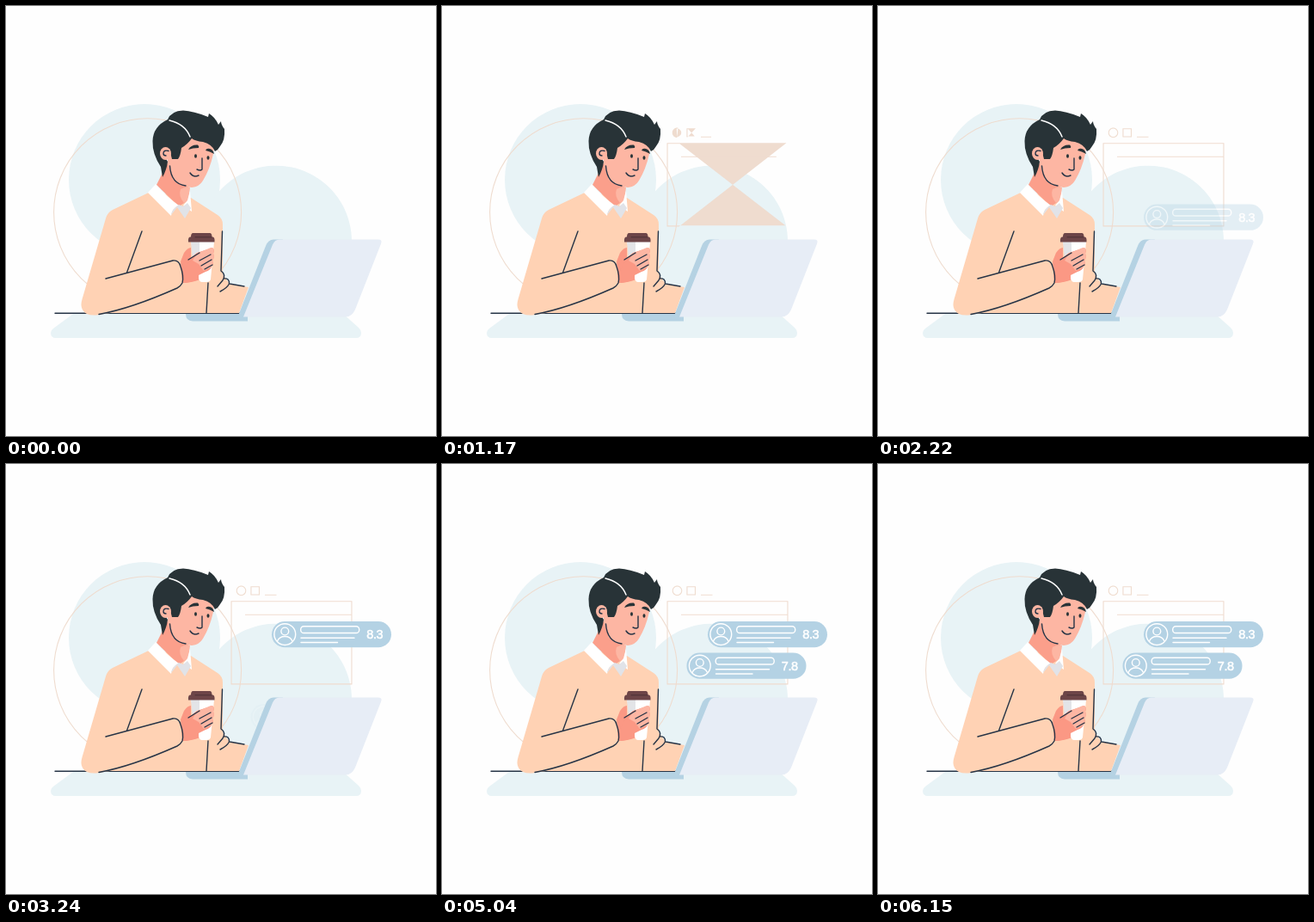
Recreate the animation shown at these times as an HTML page. Size 500 px wide and 500 px high, loop 6180 ms.

```html
<!DOCTYPE html>
<html lang="en">
<head>
<meta charset="utf-8">
<title>Coffee at the laptop</title>
<style>
  html, body { margin: 0; width: 100%; height: 100%; overflow: hidden; background: #fefefe; }
  svg { display: block; width: 100%; height: 100%; }
  .ink { fill: none; stroke: #263446; stroke-width: 1.4; stroke-linecap: round; stroke-linejoin: round; }
  .frame { fill: #efdccf; fill-rule: evenodd; }
  .thin { fill: none; stroke: #efdccf; stroke-width: 1.1; }
  .pill { fill: none; stroke: #fff; stroke-width: 1.4; stroke-linecap: round; }
  .pill text { fill: #fff; stroke-width: .55; font: 14.5px "Liberation Sans", Arial, sans-serif; letter-spacing: -.45px; }
</style>
</head>
<body>
<svg viewBox="0 0 500 500">
  <g fill="#e8f3f6">
    <circle cx="161" cy="202" r="88"/>
    <path d="M254 338A88 88 0 1 1 402 274V358H254Z"/>
    <path d="M78 358L55 375Q52 377 52 380Q52 386 58 386H407Q413 386 413 380Q413 377 410 374L392 358Z"/>
  </g>
  <circle class="thin" cx="164.600" cy="239.800" r="109"/>

  <path class="frame" id="window"/>
  <path class="thin" id="rules"/>
  <g id="pills"></g>

  <path class="ink" d="M57 357.200H281"/>

  <!-- laptop -->
  <path fill="#b5d2e3" d="M209 358H281V366.500H217Q209 366 209 358Z"/>
  <path fill="#b5d2e3" d="M270 360L302 279Q305 271.500 311 271.500H322L282 361Z"/>
  <path fill="#e7edf6" d="M276 361.500L310 277.500Q312.500 271.500 318 271.500H433Q438 271.500 436 276.500L406 353Q402 361.500 395 361.500Z"/>

  <!-- sweater -->
  <path fill="#ffd2b4" d="M168 216L124 237Q118 240 116 247L88.500 341Q85 353 94 358Q100 360.500 108 359L121 357H271L282 327L260 323L252 312V254Q252 247 246 243L215 223Z"/>

  <!-- neck, face, collar -->
  <path fill="#fb9f8b" d="M188 182L175 208L201 233L212 226V208Z"/>
  <path fill="#fdb6a3" d="M203 213Q210 209 214 211L212 226L207 229Q200 221 203 213Z"/>
  <path fill="#fdb6a3" d="M188 170L203 160L218 151L242 162L241 172Q237 190 229 203Q225 210 216 211Q201 209 194 202L188 184Z"/>
  <path fill="#fff" d="M174 207L165 217L192 244Q193 235 201 232Q187 222 174 207ZM211 226L214 215L216 239L206 232Z"/>
  <path fill="#e1e3e8" d="M201 231Q193 236 192 243L199 234L208 247L215 235L211 229L206 233Z"/>

  <!-- hair -->
  <path fill="#283337" d="M182 199L180 187Q170 172 170.500 157Q171 140 188 132Q192 122 206 121.500Q218 122 235 129L236 125Q243 129 247 138L250 134Q250 138 254 143Q255 156 249 163Q247 167 243 169Q240 161 229 158Q220 157 216 154Q211 161 204 165Q203 174 200 178H193L190 166L181 170L188 181Q187 190 182 199Z"/>
  <ellipse cx="185.500" cy="171.500" rx="6.500" ry="7.500" fill="#fdb6a3"/>
  <path fill="none" stroke="#fff" stroke-width="1.5" stroke-linecap="round" d="M190 133Q208 137 214 152"/>
  <path class="ink" d="M189 168.500Q183 167 183 171.500Q183 174 186 174M190.500 186Q192 207 209 209M228 177L228 190Q226 192 222 190M214 194Q218 200 224 197"/>
  <g fill="#283337">
    <path d="M212 167Q215 161 223 161.500Q225 163 224 165Q217 165 212 167Z"/>
    <path d="M232 168Q233 165 237 166Q241 167 242 172Q237 169 232 168Z"/>
    <ellipse cx="220.500" cy="174.500" rx="1.500" ry="2.200"/>
    <ellipse cx="235" cy="176.500" rx="1.500" ry="2.200"/>
  </g>

  <!-- sleeves -->
  <path class="ink" d="M158 262L140.500 310M251.500 262L250 308Q256 312 252 319L246 326M253 317Q260 316 259.500 323Q257 328 249 332M260 323L277 326M235 322L233 357"/>

  <!-- cup and hand -->
  <path fill="#fb9884" d="M203 297L207 287Q211 281 215 281V293L226 300V318Q215 322 205 322Z"/>
  <path fill="#fff" d="M215 274H242L238 318Q237 321 233 321H228Q225 321 224 317Z"/>
  <path fill="#e3e4e7" d="M215 274H225V296L217 295Z"/>
  <path fill="#6d4548" d="M217.500 264H237Q239.500 264 239.500 268.500H240.500Q243 269 242.500 274.500H212Q211.500 269 214 268.500H215Q215 264 217.500 264Z"/>
  <path class="ink" style="stroke:#4b2f36;stroke-width:1" d="M220 268.800H239"/>
  <path fill="#fb9884" d="M211 296L222 287L240 281Q243 283 241 288Q243 292 240 296Q242 300 239 303Q238 307 232 309L224 313V318Q214 322 205 322Z"/>
  <path fill="#fdb6a3" d="M222 288L238 281Q243 281 241 288Q243 292 240 296Q242 300 238 304L230 308L224 300L217 296Z"/>
  <path class="ink" d="M212 295L225 287M225 296L238 289M227 302L239 295M231 306L240 301"/>
  <path class="ink" d="M116 317L194 296Q201 295 203 303Q207 314 205 322Q203 326 199 328Q145 352 108 358.500"/>
</svg>

<script>
const LOOP = 6180;
const $ = id => document.getElementById(id);
const clamp = v => Math.min(1, Math.max(0, v));
const ease = v => (1 - Math.cos(Math.PI * clamp(v))) / 2;
const f = n => n.toFixed(2);

// Cuts a polyline at a share of its length; the fill closes the gap.
function trim(pts, share) {
  const seg = (a, b) => Math.hypot(b[0] - a[0], b[1] - a[1]);
  let left = 0;
  for (let i = 1; i < pts.length; i++) left += seg(pts[i - 1], pts[i]);
  left *= share;
  const out = [pts[0]];
  for (let i = 1; i < pts.length && left > 0; i++) {
    const a = pts[i - 1], b = pts[i], d = seg(a, b), k = Math.min(1, left / d);
    out.push([a[0] + (b[0] - a[0]) * k, a[1] + (b[1] - a[1]) * k]);
    left -= d;
  }
  return 'M' + out.map(p => f(p[0]) + ' ' + f(p[1])).join('L') + 'Z';
}

function loopBox(x, y, w, h, flip) {
  const s = x + w * .1, near = flip ? y : y + h, far = flip ? y + h : y;
  return [[s, near], [x, near], [x, far], [x + w, far], [x + w, near], [s, near]];
}

function loopCircle(x, y, r, dir) {
  return Array.from({ length: 41 }, (_, i) => {
    const a = Math.PI / 2 + dir * i * Math.PI / 20;
    return [x + r * Math.cos(a), y + r * Math.sin(a)];
  });
}

const boxRing = (x, y, w, h) => [
  loopBox(x, y, w, h, false),
  loopBox(x + 1.1, y + 1.1, w - 2.2, h - 2.2, true)
];
const shapes = [
  ...boxRing(261.5, 159.2, 141, 97.2),
  ...boxRing(284.4, 142.2, 10.6, 10.4),
  loopCircle(273.5, 147.3, 5.8, 1),
  loopCircle(273.5, 147.3, 4.7, -1)
];

const cards = [
  { x: 309, y: 183, score: '8.3', start: 2010 },
  { x: 284.5, y: 219.5, score: '7.8', start: 3200 }
];
$('pills').innerHTML = cards.map(c => `<g class="pill">
  <rect width="139" height="30.300" rx="15.150" fill="#b4d2e4" stroke="none"/>
  <circle cx="15.300" cy="15.100" r="12.400"/>
  <circle cx="15.300" cy="11.500" r="4.400"/>
  <path d="M6.500 23Q9 17.500 15.300 17.500Q21.600 17.500 24 23M34 19.300H96M34 24.500H76.500"/>
  <rect x="33.700" y="5.700" width="68" height="7.800" rx="3.600"/>
  <text x="110.300" y="20.300" stroke="#fff">${c.score}</text></g>`).join('');
const pills = [...$('pills').children];

function draw(t) {
  const p = ease((t - 500) / 1300);
  $('window').setAttribute('d', p > 0 ? shapes.map(s => trim(s, p)).join('') : '');
  const q = Math.min(1, p * 1.7);
  $('rules').setAttribute('d', p > 0
    ? `M278 175.300H${f(278 + 124 * q)}M301 152.300H${f(301 + 13.5 * q)}` : '');
  cards.forEach((c, i) => {
    const age = t - c.start;
    const drop = 60 * (1 - ease(age / 700));
    pills[i].setAttribute('transform', `translate(${c.x} ${f(c.y + drop)})`);
    pills[i].setAttribute('opacity', f(clamp(age / 600)));
  });
}

function tick() {
  draw(performance.now() % LOOP);
  requestAnimationFrame(tick);
}
tick();
</script>
</body>
</html>
```
